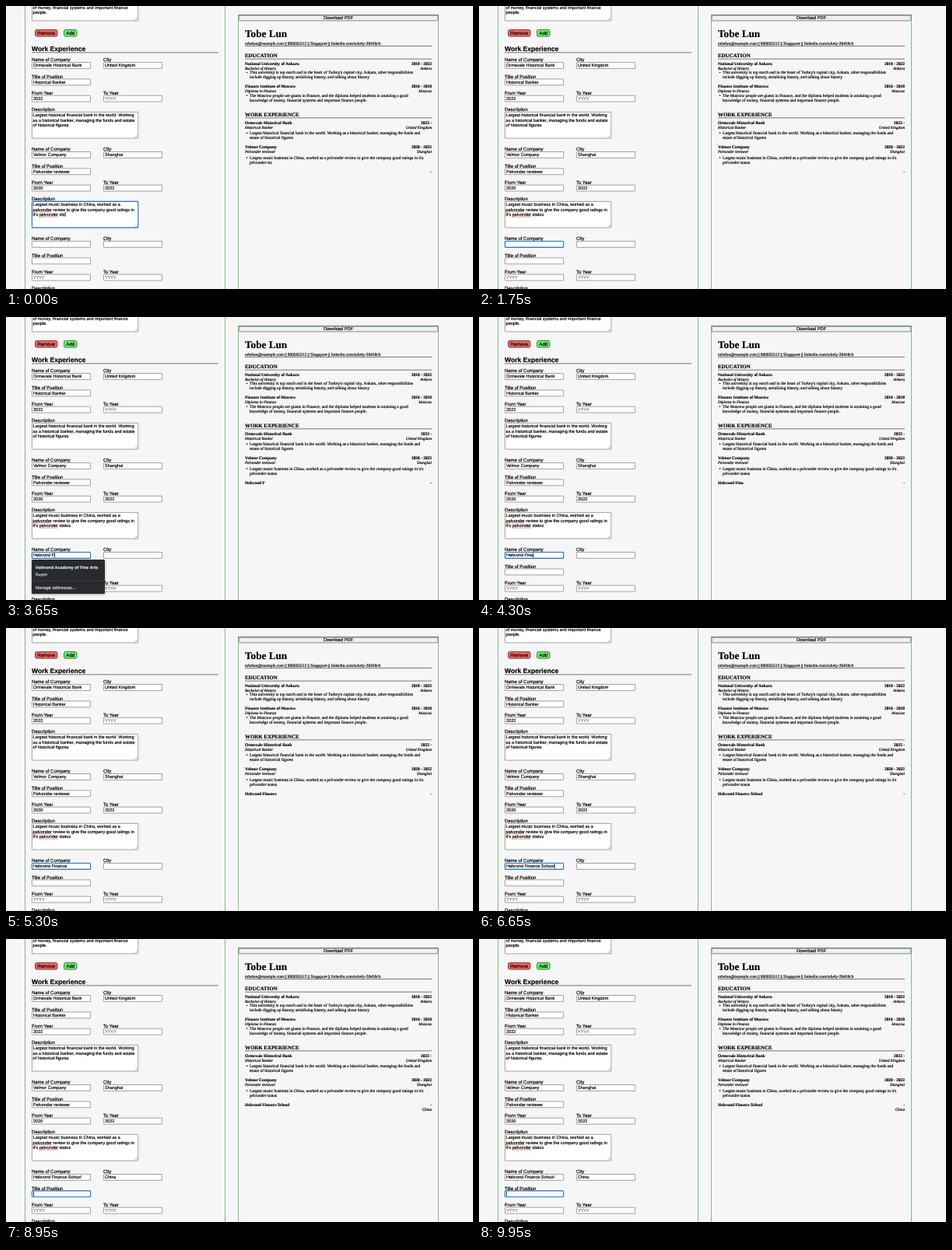
An HTML page with a canvas that plays this animation: 600x364 px, repeating every 10000 ms.

```html
<!DOCTYPE html>
<html lang="en">
<head>
<meta charset="utf-8">
<title>Resume builder</title>
<style>
html, body { margin: 0; width: 100%; height: 100%; overflow: hidden; background: #f6f6f6; }
canvas { display: block; }
</style>
</head>
<body>
<canvas id="stage" width="600" height="364"></canvas>
<script>
const ctx = document.getElementById('stage').getContext('2d');
const LOOP = 10000;
const SANS = '"Liberation Sans", Arial, sans-serif';
const SERIF = '"Liberation Serif", "Times New Roman", serif';
const INPUT = `5.53px ${SANS}`;
const LABEL = `5.95px ${SANS}`;
const BODY = `5.4px ${SERIF}`;
const BOLD = `bold 5.4px ${SERIF}`;
const ITALIC = `italic 5px ${SERIF}`;
const GREEN = '#80bd82';
const BLUE = '#1f6cd0';
const BORDER = '#7c7c7c';
const LINE = 6.3;

// A hairline stroke gives the text a slightly heavier weight.
function text(str, x, y, font, color = '#000', align = 'left') {
  ctx.font = font;
  ctx.fillStyle = ctx.strokeStyle = color;
  ctx.textAlign = align;
  ctx.lineWidth = .18;
  ctx.fillText(str, x, y);
  ctx.strokeText(str, x, y);
}

function bar(x, y, w, h, color) {
  ctx.fillStyle = color;
  ctx.fillRect(x, y, w, h);
}

function box(x, y, w, h, fill, stroke, radius = 0, weight = 1) {
  ctx.beginPath();
  ctx.roundRect(x, y, w, h, radius);
  if (fill) {
    ctx.fillStyle = fill;
    ctx.fill();
  }
  if (stroke) {
    ctx.strokeStyle = stroke;
    ctx.lineWidth = weight;
    ctx.stroke();
  }
}

function widthOf(str, font) {
  ctx.font = font;
  return ctx.measureText(str).width;
}

function inputBox(x, y, w, h, focus) {
  box(x, y, w, h, '#fff', focus ? BLUE : BORDER, focus ? 1 : .4, focus ? 1.1 : .7);
}

function field(x, y, value, { focus = false, caret = false, hint = '' } = {}) {
  inputBox(x + .4, y + .2, 75.2, 7.9, focus);
  text(value || hint, x + 2, y + 5.9, INPUT, value ? '#000' : '#777');
  if (focus && caret) bar(x + 2.1 + widthOf(value, INPUT), y + 1.1, .8, 6, '#000');
}

function area(y, lines, { focus = false, caret = false } = {}) {
  inputBox(33.4, y + .4, 136.4, 33.7, focus);
  lines.forEach((line, i) => text(line, 34.6, y + 6.2 + i * LINE, INPUT));
  ctx.strokeStyle = '#888';
  ctx.lineWidth = .6;
  ctx.beginPath();
  ctx.moveTo(165.8, y + 33); ctx.lineTo(168.8, y + 30);
  ctx.moveTo(167.6, y + 33); ctx.lineTo(168.8, y + 31.8);
  ctx.stroke();
  if (focus && caret) {
    const last = lines.length - 1;
    bar(34.8 + widthOf(lines[last], INPUT), y + 1.3 + last * LINE, .8, 6, '#000');
  }
}

function misspelt(prefix, word, y) {
  ctx.strokeStyle = '#f0483e';
  ctx.lineWidth = .9;
  ctx.setLineDash([1.2, .5]);
  ctx.beginPath();
  const x = 34.6 + widthOf(prefix, INPUT);
  ctx.moveTo(x, y);
  ctx.lineTo(x + widthOf(word, INPUT), y);
  ctx.stroke();
  ctx.setLineDash([]);
}

function labels(y) {
  const rows = [['Name of Company', 'City'], ['Title of Position'], ['From Year', 'To Year'], ['Description']];
  rows.forEach(([left, right], i) => {
    text(left, 33, y + 71.1 + i * 21.4, LABEL);
    if (right) text(right, 125, y + 71.1 + i * 21.4, LABEL);
  });
}

// Typing schedule: [first key time, key interval, characters]
const STATUS = [[300, 170, 'atus']];
const COMPANY = [[2250, 150, 'Hebvond F'], [3800, 180, 'inance'], [5750, 125, ' School']];
const CITY = [[8200, 140, 'China']];
const FOCUS = { company: 1150, city: 7050, title: 8900 };
const ERASE = 100;
const POPUP = [2250, 3800];

const typed = (runs, t) => runs.map(([start, step, chars]) =>
  chars.slice(0, Math.max(0, Math.floor((t - start) / step) + 1))).join('');

const keyTimes = [0, ERASE, ...Object.values(FOCUS)];
for (const [start, step, chars] of [...STATUS, ...COMPANY, ...CITY])
  for (let i = 0; i < chars.length; i++) keyTimes.push(start + i * step);

function stateAt(t) {
  const lastKey = Math.max(...keyTimes.filter(k => k <= t));
  return {
    caret: (t - lastKey) % 1000 < 500,
    focus: t < FOCUS.company ? 'about' : t < FOCUS.city ? 'company' : t < FOCUS.title ? 'city' : 'title',
    ending: t < ERASE ? 'sts' : 'st' + typed(STATUS, t),
    company: typed(COMPANY, t),
    city: typed(CITY, t),
    popup: t >= POPUP[0] && t < POPUP[1]
  };
}

function drawPopup() {
  ctx.save();
  ctx.shadowColor = 'rgba(0,0,0,.35)';
  ctx.shadowBlur = 3;
  ctx.shadowOffsetY = 1;
  box(33, 312, 94, 44, '#292a2d', null, 1.5);
  ctx.restore();
  text('Hebvond Academy of Fine Arts', 38, 324.4, `bold 5.45px ${SANS}`, '#e4e5e8');
  text('Rupert', 38, 332.8, `5px ${SANS}`, '#d0d2d6');
  bar(33, 339, 94, .6, '#46484c');
  text('Manage addresses...', 38, 349.6, `5.5px ${SANS}`, '#d8dade');
}

function drawForm(s) {
  bar(24, 0, 1, 364, GREEN);
  bar(281, 0, 1, 364, GREEN);

  area(-15.2, []);
  text('of money, financial systems and important finance', 34.6, 3.9, INPUT);
  text('people.', 34.6, 10.2, INPUT);
  box(37.5, 30.5, 28.5, 8.6, '#f4645f', '#6b3a38', 2, .9);
  text('Remove', 51.7, 36.9, `6.2px ${SANS}`, '#000', 'center');
  box(74.5, 30.5, 16.5, 8.6, '#6df06b', '#37703a', 2, .9);
  text('Add', 82.8, 36.9, `6.2px ${SANS}`, '#000', 'center');
  text('Work Experience', 33, 58, `bold 8.55px ${SANS}`);
  bar(33, 59.5, 240, .8, '#555');

  const jobs = [
    ['Ormevale Historical Bank', 'United Kingdom', 'Historical Banker', '2022', ''],
    ['Velmor Company', 'Shanghai', 'Pelvonder reviewer', '2020', '2022'],
    [s.company, s.city, '', '', '']
  ];
  jobs.forEach(([company, city, title, from, to], i) => {
    const y = i * 115;
    const active = name => ({ focus: i === 2 && s.focus === name, caret: s.caret });
    labels(y);
    field(33, y + 72.3, company, active('company'));
    field(125, y + 72.3, city, active('city'));
    field(33, y + 93.7, title, active('title'));
    field(33, y + 115, from, { hint: 'YYYY' });
    field(125, y + 115, to, { hint: 'YYYY' });
  });

  area(136, [
    'Largest historical financial bank in the world. Working',
    'as a historical banker, managing the funds and estate',
    'of historical figures'
  ]);
  area(251, [
    'Largest music business in China, worked as a',
    'pelvonder review to give the company good ratings in',
    "it's pelvonder " + s.ending
  ], { focus: s.focus === 'about', caret: s.caret });
  misspelt('', 'pelvonder', 264.8);
  misspelt("it's ", 'pelvonder', 271.1);
  if (s.popup) drawPopup();
}

function heading(str, y) {
  text(str, 307, y, `bold 6.9px ${SERIF}`);
  bar(307, y + 1.3, 240, .8, '#555');
}

function entry(y, name, years, role, place, lines = [], gap = 11.4) {
  text(name, 307, y, BOLD);
  text(years, 547, y, BOLD, '#000', 'right');
  text(role, 307, y + 5.9, ITALIC);
  text(place, 547, y + 5.9, ITALIC, '#000', 'right');
  if (!lines.length) return;
  ctx.beginPath();
  ctx.arc(309.5, y + gap - 1.7, .8, 0, Math.PI * 2);
  ctx.fillStyle = '#000';
  ctx.fill();
  lines.forEach((line, i) => text(line, 312.9, y + gap + i * 6, BODY));
}

function drawResume(s) {
  bar(298, 11, 1, 353, GREEN);
  bar(555, 11, 1, 353, GREEN);
  bar(298, 11, 258, 1, '#5f9a62');
  box(299.2, 12.1, 255.6, 6.8, '#efefef', '#6c6c6c', 1, .8);
  text('Download PDF', 427, 17.1, `5.7px ${SANS}`, '#000', 'center');

  text('Tobe Lun', 307, 39.7, `bold 13.2px ${SERIF}`);
  text('tobelun@example.com || 900055512 || Singapore || linkedin.com/tobely-20418cb', 307, 49.8, BODY);
  bar(307, 51, 240, .8, '#555');

  heading('EDUCATION', 66.4);
  entry(75.8, 'National University of Ankara', '2018 - 2022', 'Bachelor of History', 'Ankara', [
    "This university is top notch and in the heart of Turkey's capital city, Ankara, other responsibilities",
    'include digging up history, serializing history, and talking about history'
  ]);
  entry(105.4, 'Finance Institute of Moscow', '2016 - 2018', 'Diploma in Finance', 'Moscow', [
    'The Moscow people are giants in Finance, and the diploma helped students in attaining a good',
    'knowledge of money, financial systems and important finance people.'
  ]);

  heading('WORK EXPERIENCE', 142.2);
  entry(151.7, 'Ormevale Historical Bank', '2022 -', 'Historical Banker', 'United Kingdom', [
    'Largest historical financial bank in the world. Working as a historical banker, managing the funds and',
    'estate of historical figures'
  ], 13.4);
  entry(183.4, 'Velmor Company', '2020 - 2022', 'Pelvonder reviewer', 'Shanghai', [
    "Largest music business in China, worked as a pelvonder review to give the company good ratings in it's",
    'pelvonder ' + s.ending
  ], 13.4);
  entry(215, s.company, '-', '', s.city);
}

function frame(now) {
  const s = stateAt(now % LOOP);
  ctx.textRendering = 'geometricPrecision';
  ctx.lineJoin = 'round';
  bar(0, 0, 600, 364, '#f6f6f6');
  drawForm(s);
  drawResume(s);
  requestAnimationFrame(() => frame(performance.now() - start));
}

const start = performance.now();
frame(0);
</script>
</body>
</html>
```
